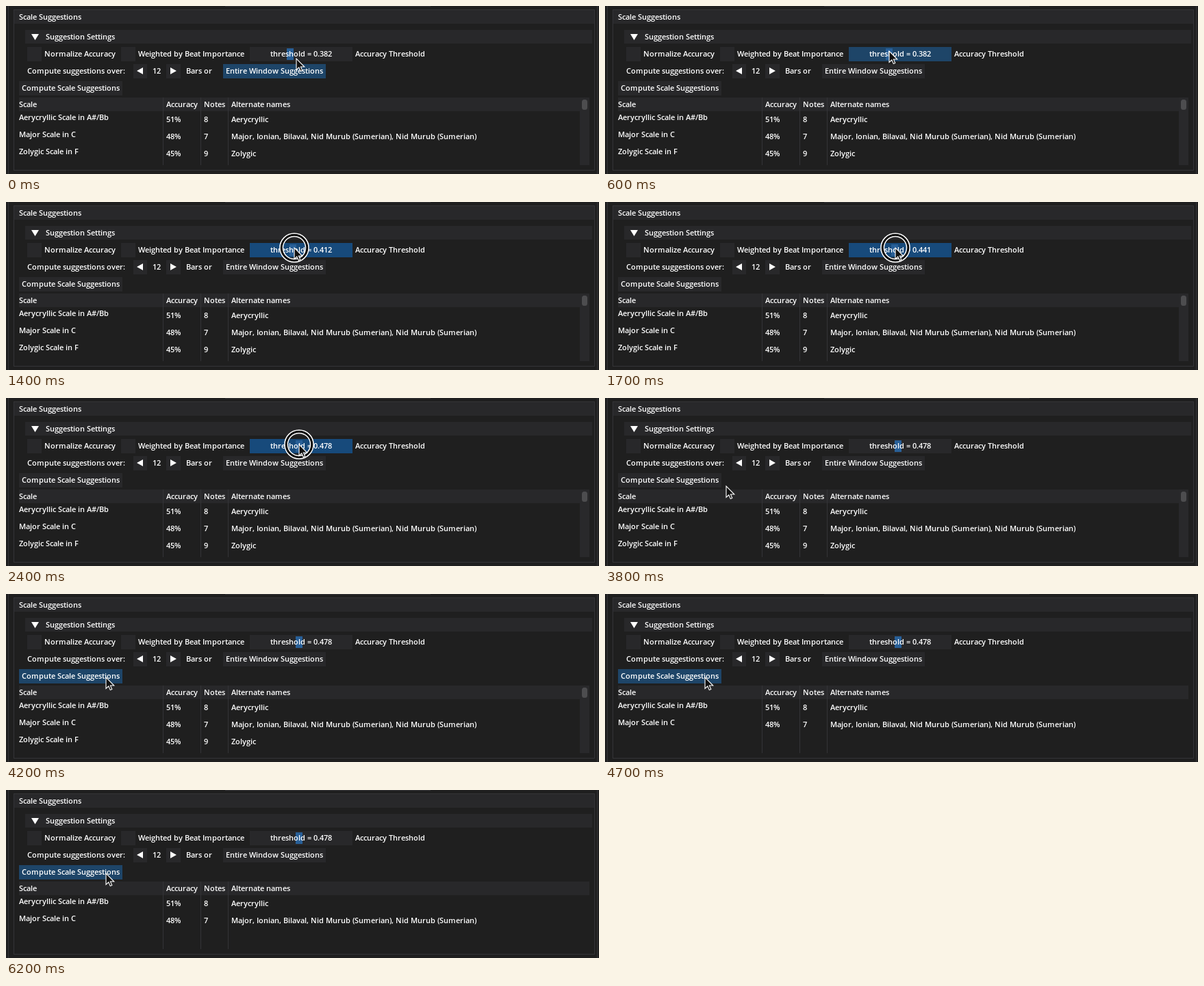
Animation of 866x246 px, one loop 6500 ms. Source, as an HTML page:

```html
<!DOCTYPE html>
<html lang="en">
<head>
<meta charset="utf-8">
<title>Scale Suggestions</title>
<style>
  html, body { margin: 0; width: 100%; height: 100%; overflow: hidden; background: #1f1f1f; }
  svg { display: block; width: 866px; height: 246px; }
  text { font: 600 11.01px "Open Sans", "Noto Sans", sans-serif; fill: #fff; font-kerning: none; white-space: pre; }
  .bar { fill: #28282a; }
  .line { fill: none; stroke: #343437; }
  .mark { fill: #fff; }
  .hover { fill: #1e4568; }
  .active { fill: #174a7b; }
</style>
</head>
<body>
<svg id="stage" viewBox="0 0 866 246">
  <rect width="866" height="246" fill="#1f1f1f"/>
  <path class="line" d="M3.5 0V246M863.5 0V246M320 .5H620"/>
  <rect class="bar" x="12" y="6" width="847" height="20"/>
  <rect class="line" x="11.5" y="5.5" width="848" height="235"/>
  <rect class="bar" x="28" y="35" width="828" height="20"/>
  <path class="mark" d="M37 41H48L42.5 50Z"/>
  <g id="frames"></g>
  <path class="mark" d="M200 90V100L191 95ZM240 90V100L249 95Z"/>
  <rect id="grab" y="62" width="10" height="17" fill="#285f97"/>
  <rect class="bar" x="19" y="134" width="833" height="20"/>
  <g id="scroll">
    <rect x="838" y="134" width="14" height="99" fill="#29292b"/>
    <rect x="841" y="137" width="8" height="15" rx="3.5" fill="#4d4d4f"/>
  </g>
  <path class="line" d="M229.5 134V233M284.5 134V233M324.5 134V233"/>
  <g id="labels"></g>
  <g id="pointer">
    <g id="ring" fill="none">
      <circle r="18.8" stroke="#fff" stroke-width="6"/>
      <circle r="18.8" stroke="#080808" stroke-width="3"/>
    </g>
    <path d="M0 0V16.5L3.8 13L6.3 18.6L8.8 17.5L6.4 12H11.8Z" fill="#111" stroke="#fff" stroke-width="1.1"/>
  </g>
</svg>
<script>
  const NS = "http://www.w3.org/2000/svg";
  const $ = id => document.getElementById(id);
  const pen = document.createElement("canvas").getContext("2d");
  pen.font = '600 11.01px "Open Sans", "Noto Sans", sans-serif';

  function add(parent, tag, attrs) {
    const el = document.createElementNS(NS, tag);
    for (const key in attrs) el.setAttribute(key, attrs[key]);
    return parent.appendChild(el);
  }

  // Glyph advances snap to whole pixels.
  function write(el, left, str) {
    if (el.textContent === str) return;
    let x = left;
    el.setAttribute("x", [...str].map(c => {
      const at = x;
      x += Math.round(pen.measureText(c).width);
      return at;
    }).join(" "));
    el.textContent = str;
  }

  function label(x, y, str, parent = $("labels")) {
    const el = add(parent, "text", { y });
    write(el, x, str);
    return el;
  }

  const frame = (x, y, width) => add($("frames"), "rect", { x, y, width, height: 21, class: "bar" });

  frame(31, 60, 21);
  frame(168, 60, 21);
  frame(186, 85, 20);
  frame(234, 85, 21);
  const slider = frame(356, 60, 150);
  const range = frame(317, 85, 150);
  const compute = frame(19, 110, 151);

  label(19, 20, "Scale Suggestions");
  label(58, 49, "Suggestion Settings");
  label(56, 74, "Normalize Accuracy");
  label(193, 74, "Weighted by Beat Importance");
  label(510, 74, "Accuracy Threshold");
  label(31, 99, "Compute suggestions over:");
  label(214, 99, "12");
  label(263, 99, "Bars or");
  label(321, 99, "Entire Window Suggestions");
  label(23, 124, "Compute Scale Suggestions");
  const value = label(386, 74, "");

  const columns = [19, 234, 289, 329];
  ["Scale", "Accuracy", "Notes", "Alternate names"].forEach((s, i) => label(columns[i], 148, s));
  const rows = [
    ["Aerycryllic Scale in A#/Bb", "51%", "8", "Aerycryllic"],
    ["Major Scale in C", "48%", "7", "Major, Ionian, Bilaval, Nid Murub (Sumerian), Nid Murub (Sumerian)"],
    ["Zolygic Scale in F", "45%", "9", "Zolygic"]
  ].map((cells, r) => {
    const g = add($("labels"), "g", {});
    cells.forEach((s, i) => label(columns[i], 170 + 25 * r - (i ? 0 : 3), s, g));
    return g;
  });

  // Pointer path: time, x, y
  const path = [
    [0, 424, 77], [100, 420, 72], [200, 417, 69], [400, 415, 67], [600, 415, 66],
    [900, 415, 66], [1100, 416, 66], [1300, 419, 67], [1400, 421, 67], [1700, 424, 67],
    [2000, 424, 67], [2300, 428, 68], [3300, 428, 68], [3400, 415, 72], [3500, 365, 88],
    [3600, 290, 108], [3700, 222, 124], [3800, 177, 129], [3900, 154, 126],
    [4000, 146, 122], [6500, 146, 122]
  ];

  function pointerAt(t) {
    const i = Math.max(1, path.findIndex(p => p[0] >= t));
    const [a, b] = [path[i - 1], path[i]];
    const k = (t - a[0]) / (b[0] - a[0]);
    return [1, 2].map(j => Math.round(a[j] + (b[j] - a[j]) * k));
  }

  const show = (el, on) => el.setAttribute("visibility", on ? "visible" : "hidden");
  const tint = (el, hover, active) => el.setAttribute("class", active ? "active" : hover ? "hover" : "bar");

  function draw(t) {
    const within = (a, b) => t >= a && t < b;
    const [x, y] = pointerAt(t);
    const drag = within(900, 2900);
    const press = within(4500, 4700);
    const fresh = t >= 4700;

    // The slider follows the pointer one tick late.
    const n = t < 900 ? 52 : drag ? pointerAt(t - 100)[0] - 363 : 65;
    write(value, 386, "threshold = " + (n / 136).toFixed(3));
    $("grab").setAttribute("x", 358 + n);

    tint(range, t < 100);
    tint(slider, within(100, 3500), drag);
    tint(compute, t >= 4000, press);
    show($("ring"), drag || press);
    show($("scroll"), !fresh);
    show(rows[2], !fresh);
    $("pointer").setAttribute("transform", `translate(${x} ${y})`);
  }

  const start = performance.now();
  function tick() {
    const t = (performance.now() - start) % 6500;
    draw(Math.floor(t / 100) * 100);
    requestAnimationFrame(tick);
  }
  tick();
</script>
</body>
</html>
```
